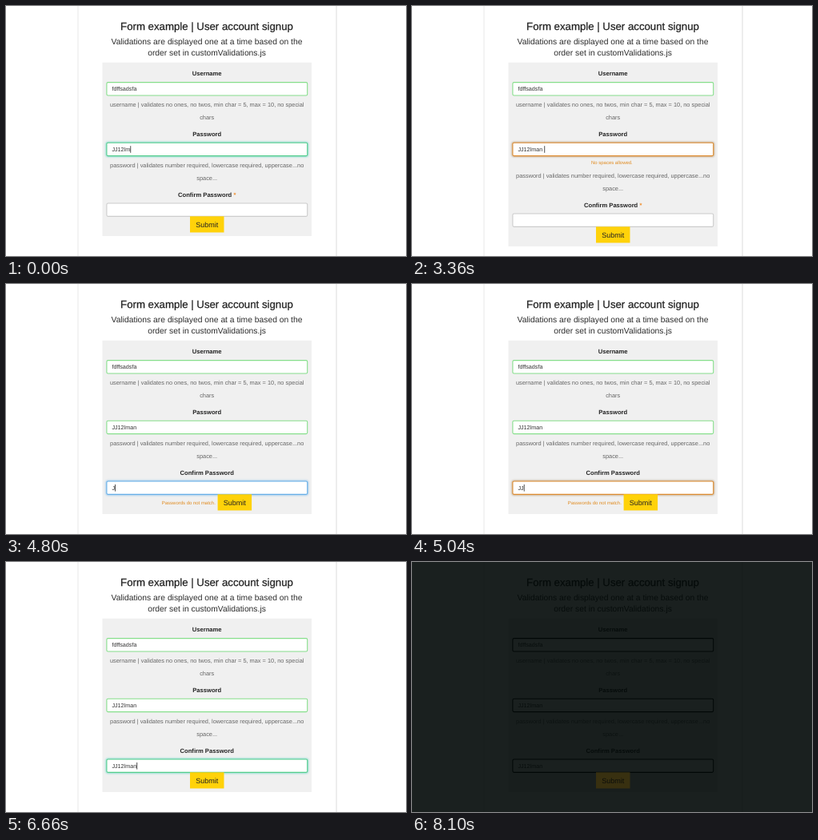
Write an HTML page that moves like this. It is 500 px wide and 313 px high and loops after 8130 ms.

```html
<!DOCTYPE html>
<html lang="en">
<head>
<meta charset="utf-8">
<title>Signup form</title>
<style>
  html, body { margin: 0; width: 100%; height: 100%; overflow: hidden; background: #fff; }
  svg { display: block; width: 500px; height: 313px; }
  text {
    font: 7.38px "Liberation Sans", Arial, sans-serif;
    text-anchor: middle; text-rendering: geometricPrecision; white-space: pre; fill: #666;
  }
  .title { font-size: 13.23px; fill: #222; stroke: #222; stroke-width: .25px; }
  .sub { font-size: 10.32px; fill: #2c2c2c; }
  .label { font-size: 7.62px; font-weight: bold; fill: #222; }
  .value { font-size: 7.2px; text-anchor: start; fill: #333; }
  .error { font-size: 5.97px; text-anchor: start; fill: #e08a1e; }
  .star { fill: #f08a24; }
  .submit { font-size: 9px; fill: #222; }
  .box { fill: #fff; stroke-width: 1.1px; }
  .glow { fill: none; stroke-width: 2.6px; filter: blur(1px); }
  .caret { fill: #222; }
  .button { fill: #ffd20a; }
  .shade { fill: #020807; fill-opacity: .9; display: none; }
  .dark .shade { display: inline; }
  .dark .box { stroke: #000 !important; }
  .dark .glow { display: none; }
  .dark .button { fill: #383010; }
  .dark .submit { fill: #0c0e0a; }
</style>
</head>
<body>
<svg id="stage" viewBox="0 0 500 313">
  <rect width="500" height="313" fill="#fff"/>
  <path d="M90 0V313" stroke="#e8e8e8"/>
  <path d="M413 0V313" stroke="#dcdcdc"/>
  <text class="title" x="251" y="29.7">Form example | User account signup</text>
  <text class="sub" x="251" y="47.8">Validations are displayed one at a time based on the</text>
  <text class="sub" x="251" y="62.4">order set in customValidations.js</text>
  <rect id="panel" x="120.5" y="70.7" width="261.5" height="217.3" fill="#f0f0f0"/>

  <text class="label" x="251.2" y="87.3">Username</text>
  <g id="user"></g>
  <text x="251.2" y="125.8">username | validates no ones, no twos, min char = 5, max = 10, no special</text>
  <text x="251.2" y="141.8">chars</text>

  <text class="label" x="251.2" y="163.2">Password</text>
  <g id="pass"></g>
  <text id="passError" class="error" x="224" y="198">No spaces allowed.</text>

  <g id="lower">
    <text x="251.2" y="201.6">password | validates number required, lowercase required, uppercase...no</text>
    <text x="251.2" y="217.6">space...</text>
    <text class="label" x="251.2" y="239.2">Confirm Password<tspan id="star" class="star"> *</tspan></text>
    <g id="confirm"></g>
    <text id="matchError" class="error" x="194.8" y="276.4">Passwords do not match.</text>
  </g>
  <rect class="shade" width="500" height="313"/>
  <g id="submit">
    <rect class="button" x="230" y="263.3" width="42.5" height="20.2"/>
    <text class="submit" x="251.2" y="276.5">Submit</text>
  </g>
</svg>
<script>
const LOOP = 8130, FADE = 150, BLINK = 500;
const $ = id => document.getElementById(id);
const show = (el, on) => { el.style.display = on ? "" : "none"; };

// Border colour, glow colour, glow strength
const GREY = [[204, 204, 204], [102, 175, 233], 0];
const BLUE = [[102, 175, 233], [102, 175, 233], .6];
const VALID = [[134, 222, 139], [100, 210, 180], 0];
const VALID_FOCUS = [[84, 205, 140], [100, 212, 195], .75];
const WRONG = [[222, 140, 48], [165, 125, 75], .6];

const T = {
  space: 3090, undo: 4080, tab: 4500, first: 4800, match: 6500, dark: 8100
};

// Typing steps are [time, value]; looks are [time, style].
const fields = [
  { id: "user", y: 95.6, typed: [[0, "fdffsadsfa"]], looks: [[0, VALID]], focus: [0, 0] },
  {
    id: "pass", y: 171.2, focus: [0, T.tab],
    typed: [[0, "JJ12lm"], [2730, "JJ12lma"], [2850, "JJ12lman"],
            [T.space, "JJ12lman "], [T.undo, "JJ12lman"]],
    looks: [[0, VALID_FOCUS], [T.space, WRONG], [T.undo, VALID_FOCUS], [T.tab, VALID]]
  },
  {
    id: "confirm", y: 247, focus: [T.tab, LOOP],
    typed: [[0, ""], [T.first, "J"], [4980, "JJ"], [5430, "JJ1"], [5610, "JJ12"],
            [5850, "JJ12l"], [6030, "JJ12lm"], [6270, "JJ12lma"], [T.match, "JJ12lman"]],
    looks: [[0, GREY], [T.tab, BLUE], [T.first, WRONG], [T.match, VALID_FOCUS]]
  }
];

for (const f of fields) {
  const g = $(f.id);
  const frame = `x="125.9" y="${f.y}" width="250.8" height="16.4" rx="1.6"`;
  g.innerHTML = `<rect class="glow" ${frame}/><rect class="box" ${frame}/>
    <text class="value" x="132.4" y="${f.y + 10.6}"></text>
    <rect class="caret" y="${f.y + 4}" width=".8" height="8.6"/>`;
  [f.glow, f.box, f.text, f.caret] = g.children;
}

const lastIndex = (steps, t) => steps.reduce((k, s, i) => s[0] <= t ? i : k, 0);
const lerp = (a, b, k) => a + (b - a) * k;
const mix = (a, b, k) => `rgb(${a.map((v, i) => Math.round(lerp(v, b[i], k)))})`;

function drawField(f, t) {
  const i = lastIndex(f.looks, t);
  const [start, to] = f.looks[i];
  const from = i ? f.looks[i - 1][1] : to;
  const k = Math.min(1, (t - start) / FADE);
  f.box.style.stroke = mix(from[0], to[0], k);
  f.glow.style.stroke = mix(from[1], to[1], k);
  f.glow.style.opacity = lerp(from[2], to[2], k);

  const [typedAt, value] = f.typed[lastIndex(f.typed, t)];
  if (f.text.textContent !== value) f.text.textContent = value;
  const [on, off] = f.focus;
  const idle = t - Math.max(on, typedAt);
  const blinkOn = t < 2730 || Math.floor(idle / BLINK) % 2 === 0;
  show(f.caret, t >= on && t < off && blinkOn);
  f.caret.setAttribute("x", 132.6 + (value ? f.text.getComputedTextLength() : 0));
}

function draw(t) {
  fields.forEach(f => drawField(f, t));
  const spaced = t >= T.space && t < T.undo;
  const mismatch = t >= T.first && t < T.match;
  const drop = spaced ? 13 : 0;
  show($("passError"), spaced);
  show($("matchError"), mismatch);
  show($("star"), t < T.first);
  $("panel").setAttribute("height", 217.3 + drop);
  $("lower").setAttribute("transform", `translate(0 ${drop})`);
  $("submit").setAttribute("transform", `translate(${mismatch ? 34.6 : 0} ${drop})`);
  $("stage").classList.toggle("dark", t >= T.dark);
}

function tick() {
  draw(performance.now() % LOOP);
  requestAnimationFrame(tick);
}
tick();
</script>
</body>
</html>
```
